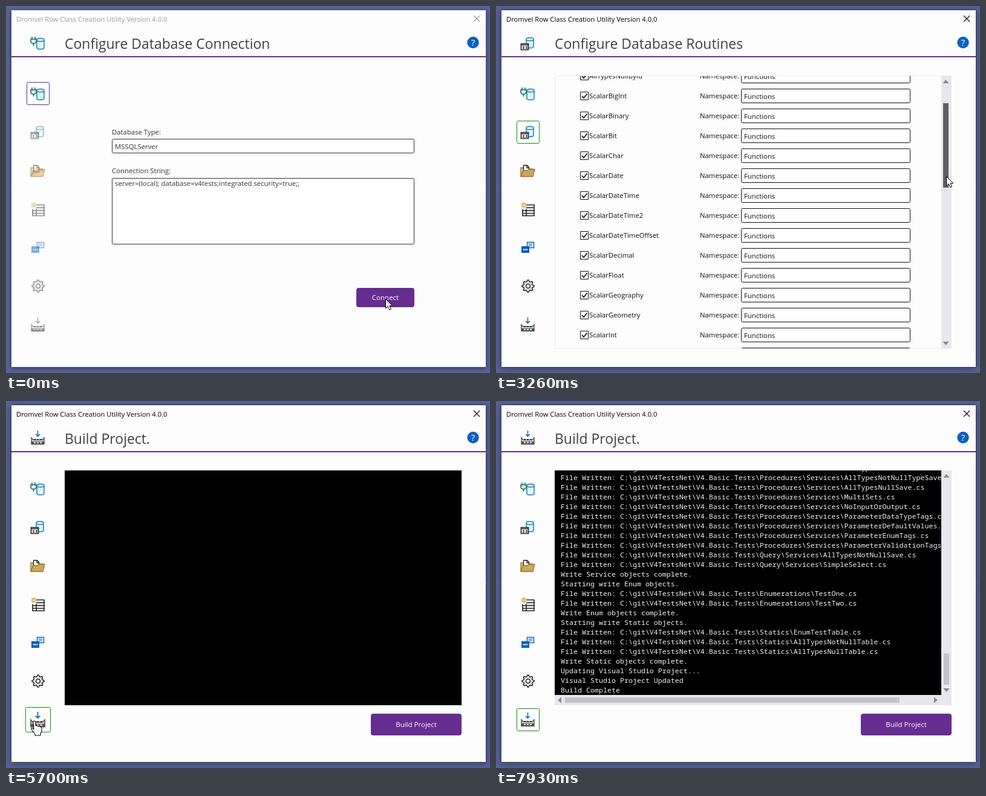
An HTML page with a canvas for the animation above (8 s loop, 800 by 608 pixels).

```html
<!DOCTYPE html>
<html lang="en">
<head>
<meta charset="utf-8">
<style>
html, body { margin: 0; width: 100%; height: 100%; overflow: hidden; }
canvas { display: block; }
</style>
</head>
<body>
<canvas id="stage" width="800" height="608"></canvas>
<script>
const ctx = document.getElementById('stage').getContext('2d');
const LOOP = 8000;
const PURPLE = '#662d91', GREEN = '#168a1c', BLUE = '#0a5fc0', PAPER = '#fdfdfd', INK = '#1e1e1e';
const SANS = '"Open Sans", "Noto Sans", sans-serif';
const MONO = '"Noto Sans Mono", "DejaVu Sans Mono", monospace';

// Routine names and build log
const scalars = ('BigInt Binary Bit Char Date DateTime DateTime2 DateTimeOffset Decimal Float Geography ' +
  'Geometry Int Money NChar Numeric NVarchar Real SmallDateTime SmallInt SmallMoney Time TinyInt ' +
  'UniqueIdentifier VarBinary Varchar XML').split(' ');
const groups = {
  Functions: ['AllTypesNotNullById', 'AllTypesNullById', ...scalars.map(s => 'Scalar' + s)],
  Procedures: ('AllTypesNotNullSave AllTypesNotNullTypeSave AllTypesNullSave MultiSets NoInputOrOutput ' +
    'ParameterDataTypeTags ParameterDefaultValues ParameterEnumTags ParameterValidationTags').split(' '),
  Query: ['AllTypesNotNullSave', 'SimpleSelect']
};
const file = path => 'File Written: C:\\git\\V4TestsNet\\V4.Basic.Tests\\' + path + '.cs';
const files = (folder, ...suffixes) => Object.entries(groups).flatMap(([group, names]) =>
  names.flatMap(name => suffixes.map(s => file(`${group}\\${folder}\\${name}${s}`))));
const log = [
  'Ready...', 'Starting build...',
  'Starting collect routines.', 'Complete collect routines with count: 40.',
  'Starting collect Enum Queries.', 'Complete collect Enum Queries with count: 2.',
  'Starting collect Static Queries.', 'Complete collect Static Queries with count: 3.',
  'Starting write base objects.',
  ...['SqlPlusBase\\ValidInput', 'SqlPlusBase\\Helpers', 'Functions\\Services\\ServiceBase',
    'Procedures\\Services\\ServiceBase', 'Query\\Services\\ServiceBase', 'SqlPlusBase\\TransientErrors'].map(file),
  'Write base objects complete.', 'Starting write Model objects.',
  ...files('Models', 'Input', 'Output'),
  'Write Model objects complete.', 'Starting write Service objects.',
  ...files('Services', ''),
  'Write Service objects complete.', 'Starting write Enum objects.',
  file('Enumerations\\TestOne'), file('Enumerations\\TestTwo'),
  'Write Enum objects complete.', 'Starting write Static objects.',
  ...['EnumTestTable', 'AllTypesNotNullTable', 'AllTypesNullTable'].map(n => file('Statics\\' + n)),
  'Write Static objects complete.', 'Updating Visual Studio Project...',
  'Visual Studio Project Updated', 'Build Complete'
];

// Pointer path: time, x, y
const pointerPath = [
  [0, 627, 485], [500, 627, 485], [580, 623, 488], [660, 628, 478], [2200, 628, 478],
  [2320, 650, 430], [2520, 718, 300], [2700, 739, 254], [2900, 739, 254], [3260, 744, 281],
  [3480, 749, 430], [3700, 753, 531], [3730, 753, 528], [4100, 753, 528], [4300, 620, 480],
  [4560, 363, 435], [4720, 140, 490], [4860, 1, 543], [4930, 1, 543], [5150, 20, 537],
  [5400, 46, 533], [5700, 47, 531], [5760, 47, 531], [5900, 110, 526], [6250, 520, 530],
  [6530, 661, 538], [7060, 661, 538], [7180, 520, 520], [7360, 182, 485], [7480, 90, 520],
  [7600, 30, 545], [LOOP, 30, 545]
];
const clamp = (v, lo, hi) => Math.min(hi, Math.max(lo, v));

function pointerAt(t) {
  const i = pointerPath.findIndex(p => p[0] > t);
  const [t0, x0, y0] = pointerPath[i - 1], [t1, x1, y1] = pointerPath[i];
  const u = (t - t0) / (t1 - t0);
  return { x: Math.round(x0 + (x1 - x0) * u), y: Math.round(y0 + (y1 - y0) * u) };
}

// Drawing helpers
function text(str, x, y, color = INK, size = 11.35, align = 'left', family = SANS) {
  ctx.font = `${size}px ${family}`;
  ctx.textAlign = align;
  ctx.fillStyle = color;
  ctx.fillText(str, x, y);
}
function fill(color, x, y, w, h) {
  ctx.fillStyle = color;
  ctx.fillRect(x, y, w, h);
}
function box(x, y, w, h, stroke, back, radius = 2) {
  ctx.beginPath();
  ctx.roundRect(x + .5, y + .5, w - 1, h - 1, radius);
  if (back) { ctx.fillStyle = back; ctx.fill(); }
  ctx.strokeStyle = stroke;
  ctx.lineWidth = 1;
  ctx.stroke();
}
function path(d, stroke, back, width = 1.3) {
  const p = new Path2D(d);
  if (back) { ctx.fillStyle = back; ctx.fill(p); }
  if (stroke) { ctx.strokeStyle = stroke; ctx.lineWidth = width; ctx.stroke(p); }
}
function clipped(x, y, w, h, draw) {
  ctx.save();
  ctx.beginPath();
  ctx.rect(x, y, w, h);
  ctx.clip();
  draw();
  ctx.restore();
}
function button(label, x, y, w, h) {
  box(x, y, w, h, PURPLE, PURPLE, 3);
  text(label, x + w / 2, y + h / 2 + 4, '#fff', 11.5, 'center');
}
function arrowHead(x, y, dx, dy) {
  path(`M${x + dx * 3} ${y + dy * 3}L${x - dx * 3 + dy * 5} ${y - dy * 3 + dx * 5}L${x - dx * 3 - dy * 5} ${y - dy * 3 - dx * 5}Z`, null, '#868999');
}

// Icons, each centred on 0,0
const cylinder = (x, y, h) => path(`M${x - 6} ${y}a6 2.6 0 0 1 12 0v${h}a6 2.6 0 0 1 -12 0zm0 0a6 2.6 0 0 0 12 0`, '#0d82b0', '#e3f2f8', 1.5);
const icons = [
  () => {
    path('M-9-10v4M-4-10v4M-11-6h9v3q0 4-4.5 4t-4.5-4zM-6.5 1v4', '#0b6b58', null, 1.6);
    cylinder(5, -5, 13);
  },
  () => {
    cylinder(4, -7, 12);
    path('M-10.5 0.5h12v10h-12z', INK, '#fff', 1.6);
    path('M-10 2.5h11M-8 5.5h3M-3 5.5h3M-8 8h3M-3 8h3', INK, null, 1.5);
  },
  () => {
    path('M-11 9v-14h7l2 2h10v4', '#9a7423', '#d9bd80');
    path('M-6.5 2v-11h6l3 3v8z', INK, '#fff');
    path('M-1-9v4h4', INK);
    path('M-11 9.5l4-10h7l2-2h10l-3 12z', '#9a7423', '#c9a75f');
  },
  () => {
    path('M-2-7.5h13v18h-19v-11', INK, '#fff', 1.6);
    fill('#d8e8f0', -1, -2, 11, 4);
    path('M-2-3h13M-8 2h19M-8 6.5h19M-2-1v11', INK, null, 1.6);
    path('M-6-12v10M-11-7h10M-9.5-10.5l7 7M-2.5-10.5l-7 7', '#c69226', null, 1.2);
    path('M-7.5-7h3', '#fff', null, 2);
  },
  () => {
    path('M-.5-8.5h11v9h-11z', BLUE, '#e6f0fb', 1.4);
    path('M2-5.5h6M2-3h6', BLUE, null, 1.2);
    fill(BLUE, -10, -2, 13, 11);
    path('M-7.5 3.5h8', '#fff', null, 1.6);
  },
  () => {
    let d = '';
    for (let i = 0; i < 32; i++) {
      const r = i % 4 < 2 ? 10 : 7.4, a = (i - .5) * Math.PI / 16;
      d += `${i ? 'L' : 'M'}${1 + r * Math.cos(a)} ${r * Math.sin(a)}`;
    }
    path(d + 'Z', INK, '#f4f4f4', 1.5);
    path('M4.5 0a3.5 3.5 0 1 1 -7 0a3.5 3.5 0 1 1 7 0z', INK, PAPER, 1.5);
  },
  () => {
    path('M-10 0v10.500h21v-10.500l-3 3.500h-15z', '#505050', '#e4e4e4', 1.4);
    fill('#505050', -10, 6, 21, 5);
    for (const x of [-6, -1, 4]) { fill('#303030', x, 2, 3, 2); fill('#fff', x, 7, 3, 2); }
    path('M.5-12v9M-3-6l3.500 3.500l3.500-3.500', BLUE, null, 1.5);
  }
];
function icon(i, x, y, scale = 1, alpha = 1) {
  ctx.save();
  ctx.translate(x, y);
  ctx.scale(scale, scale);
  ctx.globalAlpha = alpha;
  icons[i]();
  ctx.restore();
}

// Pages
function connectionPage() {
  text('Database Type:', 175, 213, '#333');
  box(175, 220, 500, 24, '#333', '#fff');
  text('MSSQLServer', 180, 237, '#333');
  text('Connection String:', 175, 277, '#333');
  box(175, 285, 500, 110, '#333', '#fff');
  text('server=(local); database=v4tests;integrated security=true;;', 180, 298, '#333');
  button('Connect', 579, 467, 96, 32);
}

function listRow(y, name, group, header) {
  if (y < 95 || y > 590) return;
  const left = header ? 125 : 139, field = header ? 396 : 405;
  if (header) path(`M113 ${y - 3}v6h-6z`, null, '#333');
  box(left, y - 7, 14, 14, '#111', '#fff', 0);
  path(`M${left + 3} ${y}l3 3.500l5.500-7`, '#111', null, 1.7);
  text(name, header ? 145 : 154, y + 4, '#111');
  text('Namespace:', field - 68, y + 4, '#111');
  box(field, y - 12, header ? 300 : 280, 24, '#111', '#fff');
  text(group, field + 5, y + 5, '#111');
}

function routinesPage(t, pointer) {
  const thumb = t < 2900 ? 133 : t < 3700 ? clamp(pointer.y - 121, 133, 410) : 410;
  const scroll = Math.round((thumb - 133) / 277 * 889);
  box(97, 115, 656, 453, '#ececef', null, 0);
  clipped(98, 116, 638, 451, () => {
    let y = 138 - scroll;
    for (const [group, label] of [['Functions', 'funcs'], ['Procedures', 'procs']]) {
      listRow(y, label, group, true);
      groups[group].forEach((name, i) => listRow(y + 35 + i * 33, name, group));
      y += 42 + groups[group].length * 33;
    }
  });
  fill('#e8e7ed', 736, 116, 16, 451);
  const color = t < 2600 || t >= 4130 ? '#c4c3cb' : t < 2900 ? '#868689' : '#606063';
  fill(color, 739, thumb, 9, 140);
  arrowHead(743.5, 125, 0, -1);
  arrowHead(743.5, 559, 0, 1);
}

function visibleLines(t) {
  if (t < 6630) return 0;
  if (t < 6690) return 2;
  if (t < 6760) return 9;
  return Math.floor(15 + clamp((t - 7400) / 530, 0, 1) * (log.length - 15));
}

function buildPage(t) {
  const count = visibleLines(t), scrolling = count > 15;
  const width = scrolling ? 639 : 656, height = scrolling ? 372 : 389;
  const overflow = Math.max(0, count * 16 - height);
  fill('#000', 97, 115, 656, 389);
  clipped(97, 115, width, height, () => {
    for (let i = Math.floor(overflow / 16); i < count; i++)
      text(log[i], 107, 127 + i * 16 - overflow, '#f2f2f2', 11.66, 'left', MONO);
  });
  if (scrolling) {
    fill('#e8e7ed', 97, 487, 656, 17);
    fill('#c4c3cb', 114, 491, 553, 9);
    arrowHead(105, 495.5, -1, 0);
    arrowHead(727, 495.5, 1, 0);
    if (overflow) {
      const thumb = 338 * height / (count * 16);
      fill('#e8e7ed', 736, 115, 17, 372);
      fill('#c4c3cb', 740, 470 - thumb, 9, thumb);
      arrowHead(744.5, 124, 0, -1);
      arrowHead(744.5, 479, 0, 1);
    }
  }
  button('Build Project', 603, 518, 150, 36);
}

const pages = [
  { title: 'Configure Database Connection', draw: connectionPage, accent: PURPLE, headY: 61 },
  { title: 'Configure Database Routines', draw: routinesPage, accent: GREEN, headY: 62, icon: 1 },
  { title: 'Build Project.', draw: buildPage, accent: GREEN, headY: 61, icon: 6 }
];

function drawPointer(t, { x, y }, page, overIcon) {
  if (t >= 7700) return;
  const overField = page === 1 && x > 405 && x < 685;
  const overBuild = page === 2 && x > 603 && x < 753 && y > 518 && y < 554;
  ctx.save();
  ctx.translate(x, y);
  ctx.lineJoin = 'round';
  if (overField || (t >= 1700 && t < 1760))
    path('M-2.500-8h2.500h3M.5-8v16M-2.500 8h6', '#111', null, 1.2);
  else if (overIcon || overBuild)
    path('M-2 1q0-2 2-2t2 2v6q3-1 4 1q3-1 4 1q2 0 2 2v5l-2 4v3h-9v-2l-6-8q-1-3 2-2l2 2z', '#000', '#fff', 1.1);
  else
    path('M.5 .5v15.500l3.700-3.400l2.700 5.900l2.600-1.200l-2.600-5.600h4.900z', '#000', '#fff', 1);
  ctx.restore();
}

function draw(t) {
  const pointer = pointerAt(t);
  const pageIndex = t < 1760 ? 0 : t < 5600 ? 1 : 2;
  const page = pages[pageIndex], current = page.icon || 0;
  const active = t >= 960;
  const overIcon = pointer.x > 33 && pointer.x < 73 && pointer.y > 508 && pointer.y < 548;

  fill('#58649a', 0, 0, 800, 608);
  ctx.save();
  ctx.shadowColor = 'rgba(0,0,0,.4)';
  ctx.shadowBlur = active ? 12 : 7;
  ctx.shadowOffsetY = 2;
  fill(PAPER, 8, 6, 786, 593);
  ctx.restore();
  box(8, 6, 786, 593, active ? '#383d5c' : '#4a5078', PAPER, 0);

  const titleInk = active ? '#000' : '#999';
  text('Dromvel Row Class Creation Utility Version 4.0.0', 17, 26, titleInk, 11.2);
  path('M773 16l10 10M783 16l-10 10', titleInk, null, 1.1);

  icon(current, 52, page.headY);
  text(page.title, 97, 71, '#404040', 22.95);
  ctx.beginPath();
  ctx.arc(772, 60.5, 9.7, 0, 7);
  ctx.fillStyle = BLUE;
  ctx.fill();
  text('?', 772, 66, '#fff', 15, 'center');
  fill(PURPLE, 9, 83, 784, 2);

  icons.forEach((_, i) => {
    const y = 145 + i * 63.85, hover = i === 6 && overIcon;
    const size = hover ? 42 : 38;
    if (i === current || hover)
      box(53 - size / 2, Math.round(y - size / 2), size, size, page.accent, '#fff');
    icon(i, 52, Math.round(y), size / 38, pageIndex === 0 && i ? .5 : 1);
  });
  page.draw(t, pointer);

  if (t >= 1230 && t < 1760) {
    fill('rgba(0,0,0,.2)', 9, 37, 784, 561);
    text('Loading...', 326, 332, '#fff', 33);
  }
  drawPointer(t, pointer, pageIndex, overIcon);
}

function frame() {
  draw(performance.now() % LOOP);
  requestAnimationFrame(frame);
}
frame();
</script>
</body>
</html>
```
